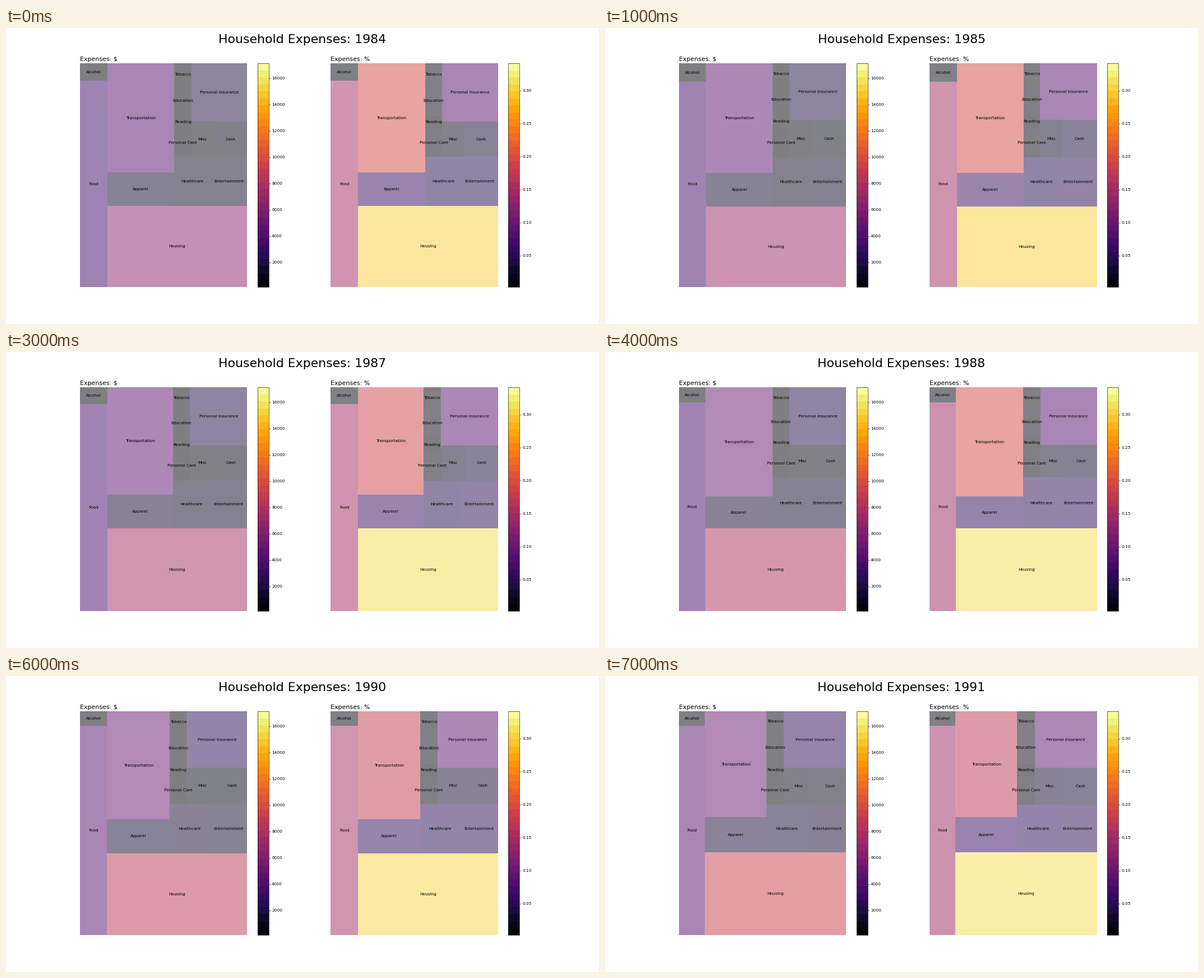
A matplotlib script that plays this animation: 1058x529 px, repeating every 8 s.

```python
import matplotlib.pyplot as plt
import numpy as np
from matplotlib.animation import FuncAnimation
from matplotlib.cm import ScalarMappable
from matplotlib.colors import ListedColormap, Normalize
from matplotlib.patches import Rectangle

plt.rcParams["font.family"] = "DejaVu Sans"

LABELS = ["Food", "Alcohol", "Housing", "Apparel", "Transportation",
          "Healthcare", "Entertainment", "Personal Care", "Reading",
          "Education", "Tobacco", "Misc", "Cash", "Personal Insurance"]
FIRST_YEAR = 1984
EXPENSES = np.array([
    [3290, 275, 6674, 1319, 4304, 1049, 1055, 289, 132, 303, 228, 451, 706, 1897],
    [3477, 306, 7087, 1420, 4587, 1108, 1170, 303, 141, 321, 219, 529, 805, 2016],
    [3448, 273, 7292, 1346, 4842, 1135, 1149, 303, 140, 314, 230, 522, 746, 2127],
    [3664, 289, 7569, 1446, 4600, 1135, 1193, 330, 142, 337, 232, 562, 741, 2175],
    [3748, 269, 8079, 1489, 5093, 1298, 1329, 334, 150, 342, 242, 578, 693, 2249],
    [4152, 284, 8609, 1582, 5187, 1407, 1424, 365, 157, 367, 261, 643, 900, 2472],
    [4296, 293, 8703, 1618, 5120, 1480, 1422, 364, 153, 406, 274, 842, 816, 2592],
    [4271, 297, 9252, 1735, 5151, 1554, 1472, 399, 163, 447, 276, 860, 950, 2787],
])
GROUP_SIZES = [2, 1, 2, 2, 4, 2, 1]
INFERNO = plt.get_cmap("inferno")
BANDS = 32
BANDED = ListedColormap(INFERNO((np.arange(BANDS) + 0.5) / BANDS))


def treemap(shares):
    """Cut groups off the unit square, alternately as columns and rows."""
    x, y, width, height = 0.0, 0.0, 1.0, 1.0
    boxes, start = [], 0
    for index, size in enumerate(GROUP_SIZES):
        group = shares[start:start + size]
        start += size
        total = group.sum()
        if index % 2 == 0:
            thickness, bottom = total / height, y
            for share in group:
                boxes.append((x, bottom, thickness, share / thickness))
                bottom += share / thickness
            x, width = x + thickness, width - thickness
        else:
            thickness, left = total / width, x
            for share in group:
                boxes.append((left, y, share / thickness, thickness))
                left += share / thickness
            y, height = y + thickness, height - thickness
    return boxes


class Panel:
    def __init__(self, ax, title, norm, ticks):
        self.norm = norm
        ax.set(xlim=(0, 1), ylim=(0, 1))
        ax.axis("off")
        ax.set_title(title, loc="left", fontsize=15)
        ax.figure.colorbar(ScalarMappable(norm, BANDED), ax=ax, ticks=ticks)
        self.tiles = [ax.add_patch(Rectangle((0, 0), 0, 0, linewidth=0, alpha=0.5))
                      for _ in LABELS]
        self.names = [ax.text(0, 0, label, ha="center", va="center", fontsize=10)
                      for label in LABELS]

    def update(self, boxes, values):
        colors = INFERNO(self.norm(values))
        for tile, name, box, color in zip(self.tiles, self.names, boxes, colors):
            x, y, width, height = box
            tile.set_bounds(x, y, width, height)
            tile.set_facecolor(color)
            name.set_position((x + width / 2, y + height / 2))


fig, (left_ax, right_ax) = plt.subplots(1, 2, figsize=(20, 10), dpi=52.9)
fig.subplots_adjust(left=0.125, right=0.9, bottom=0.125, top=0.88, wspace=0.2)
heading = fig.suptitle("", fontsize=30)
dollars = Panel(left_ax, "Expenses: $", Normalize(116, 17109),
                np.arange(2000, 17000, 2000))
percent = Panel(right_ax, "Expenses: %", Normalize(0.0023, 0.3409),
                np.arange(1, 7) * 0.05)


def draw(frame):
    values = EXPENSES[frame]
    shares = values / values.sum()
    boxes = treemap(shares)
    heading.set_text(f"Household Expenses: {FIRST_YEAR + frame}")
    dollars.update(boxes, values)
    percent.update(boxes, shares)
    return []


animation = FuncAnimation(fig, draw, frames=len(EXPENSES), interval=1000,
                          repeat=True, repeat_delay=0)
plt.show()
```
